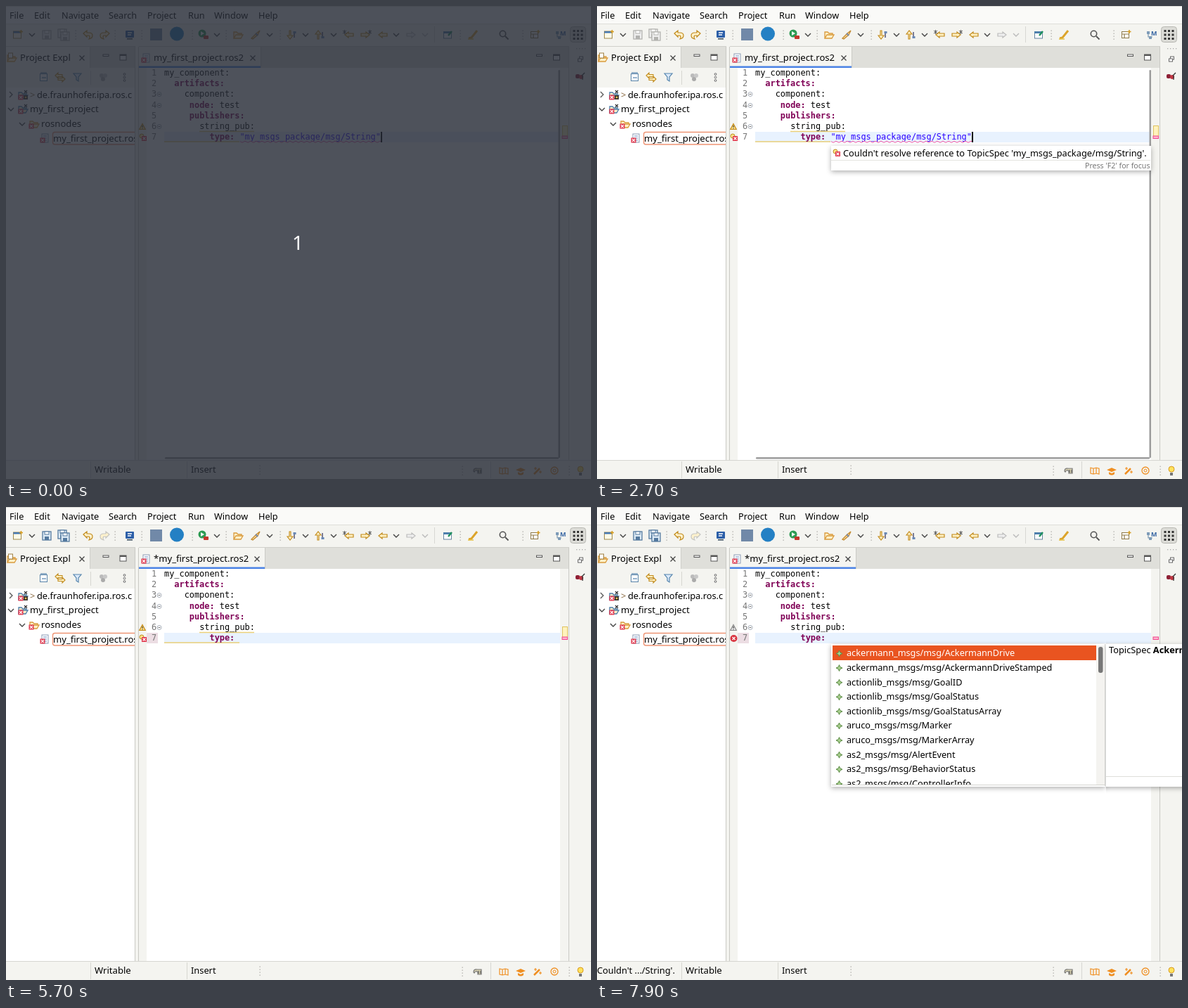
An HTML page that plays this animation: 832x673 px, repeating every 8000 ms.

```html
<!DOCTYPE html>
<html lang="en">
<head>
<meta charset="utf-8">
<title>Editor content assist</title>
<style>
html, body { margin: 0; width: 100%; height: 100%; overflow: hidden; background: #f4f4f0; }
svg { display: block; }
text { font: 12.8px "Noto Sans", "Open Sans", sans-serif; fill: #000; white-space: pre; }
.title { font-size: 13.1px; }
.item { font-size: 12.7px; }
.hint { font-size: 10.6px; fill: #777; }
.code { font: 11.9px "DejaVu Sans Mono", monospace; }
.key { font-weight: bold; fill: #7f0055; }
.str { fill: #2a00ff; }
.num { fill: #777; }
.white, .picked text { fill: #fff; }
</style>
</head>
<body>
<svg id="stage" width="832" height="673"></svg>
<script>
const LOOP = 8000, CHAR = 7.164, LEFT = 225, ROW = 15.2;
const col = c => LEFT + c * CHAR;
const baseline = n => Math.round(99 + ROW * n);

// Markup helpers
const rect = (x, y, w, h, fill, more = '') =>
  `<rect x="${x}" y="${y}" width="${w}" height="${h}" fill="${fill}" ${more}/>`;
const line = (d, stroke = '#444', width = 1.2, fill = 'none') =>
  `<path d="${d}" stroke="${stroke}" stroke-width="${width}" fill="${fill}"/>`;
const shape = (d, fill) => `<path d="${d}" fill="${fill}"/>`;
const dot = (x, y, r, fill, more = '') => `<circle cx="${x}" cy="${y}" r="${r}" fill="${fill}" ${more}/>`;
const text = (x, y, s, cls = '', more = '') => `<text x="${x}" y="${y}" class="${cls}" ${more}>${s}</text>`;
const group = (id, body, more = '') => `<g id="${id}" ${more}>${body}</g>`;

// Icons, drawn around their centre
const chevron = (x, y, c = '#444') => line(`M${x - 4} ${y - 2}l4 4 4-4`, c, 1.4);
const close = (x, y) => line(`M${x - 3.5} ${y - 3.5}l7 7m0-7l-7 7`, '#444', 1.3);
const grip = (x, y = 41) => [-6, -2, 2, 6].map(d => rect(x - .5, y + d - .5, 1.3, 1.3, '#aaa9a4')).join('');
const windowButtons = (x, y) =>
  rect(x - 4, y - 4, 8, 2.5, '#fff', 'stroke="#555"') +
  rect(x + 20, y - 4, 9, 8, '#fff', 'stroke="#555"') + rect(x + 20, y - 4, 9, 2, '#555');
const badge = (x, y) => rect(x - 3.5, y - 3.5, 7, 7, '#e0344a') +
  line(`M${x - 2} ${y - 2}l4 4m0-4l-4 4`, '#fff', 1.2);
const page = (x, y) => rect(x - 4, y - 6, 9, 12, '#fff', 'stroke="#8b9bb5"') +
  line(`M${x - 2} ${y - 3}h5m-5 3h5m-5 3h5`, '#6c8fc4', 1) + badge(x - 3, y + 3);
const folder = (x, y, c = '#d99a3d') =>
  line(`M${x - 6} ${y + 5}v-9h4l2 2h5v2m-11 5l3-5h10l-3 5z`, c, 1.3, '#fff1c9');
const project = (x, y) => folder(x, y, '#4b7eaa') +
  line(`M${x + 2} ${y - 7}l4 4m0-4l-4 4`, '#333', 1.2) + badge(x - 3, y + 3);
const floppy = (x, y, c, fill) => rect(x - 6, y - 6, 12, 12, fill, `stroke="${c}" stroke-width="1.3"`) +
  rect(x - 3, y - 6, 6, 4, '#fff', `stroke="${c}"`) + rect(x - 3, y + 1, 6, 5, c);
const saves = (c, fill) => floppy(58, 41, c, fill) + floppy(80, 39, c, fill) + floppy(84, 43, c, fill);
const flipped = (x, sx, sy, body) => `<g transform="translate(${x} 41) scale(${sx} ${sy})">${body}</g>`;
const bend = (x, s, c) => flipped(x, s, 1,
  line('M-7-2l5-4v3h3q5 0 5 4 0 4-5 5 2-3 0-5h-3v2z', c, 1.2, '#fff2cc'));
const arrow = (x, s, c = '#c18a1b', fill = '#fff0c2') => flipped(x, s, 1,
  line('M-6 0l5-4v2h7v4h-7v2z', c, 1.2, fill));
const step = (x, s) => flipped(x, 1, s, line('M-3-6v7h-3l4 5 4-5h-3v-7z', '#c18a1b', 1.1, '#fff0c2') +
  line('M4-5v9', '#557', 1.5) + rect(2.5, -5, 4, 3, '#6a89b5'));
const star = (x, y) => line(`M${x - 6} ${y - 4}l5 4m-5 0l5-4m-2.5-1v6`, '#555', 1);
const triangle = (x, y, c, fill) => line(`M${x} ${y - 4}l4.2 8h-8.4z`, c, 1.2, fill) +
  line(`M${x} ${y - 1.5}v2.5m0 1v1`, '#333', 1.2);
const spark = (x, y) => line(
  `M${x} ${y - 4.5}l1.4 3.1 3.1 1.4-3.1 1.4-1.4 3.1-1.4-3.1-3.1-1.4 3.1-1.4z`, '#5b8a45', 1, '#a8d08d');
const quickFix = (x, y) => dot(x - 2, y - 2, 3, '#ffe58a', 'stroke="#b98b20"') + badge(x + 1.5, y + 1.5);

function toolbar() {
  const menus = [[5, 'File'], [40, 'Edit'], [79, 'Navigate'], [146, 'Search'], [201, 'Project'],
    [259, 'Run'], [296, 'Window'], [359, 'Help']];
  const grid = [0, 1, 2].flatMap(i => [0, 1, 2].map(j => rect(806.5 + i * 5.5, 34 + j * 5.5, 3, 3, '#333')));
  return rect(0, 0, 832, 26, '#fafaf8') + rect(0, 0, 832, 1, '#d8d8d4') +
    menus.map(([x, s]) => text(x, 18, s, 'item')).join('') + rect(0, 25, 832, 1, '#deded9') +
    rect(10.5, 36, 11, 10, '#fffbe8', 'stroke="#a08a4c"') + rect(10.5, 36, 11, 2.5, '#4678b2') +
    line('M21.5 34v5m-2.5-2.5h5', '#d59b1c', 1.5) +
    [37, 300, 375, 426, 466, 555].map(x => chevron(x, 41)).join('') + chevron(596, 41, '#bbb') +
    [99, 155, 193, 265, 313, 390, 646, 735].map(x => grip(x)).join('') + rect(609, 29, 1, 23, '#d8d8d3') +
    group('clean', saves('#b3b3b0', '#eee') + bend(140, -1, '#c18a1b')) +
    group('dirty', saves('#557a9f', '#dceaf5') + bend(140, -1, '#c5c5c1')) + bend(117, 1, '#c18a1b') +
    rect(170, 35, 12, 10, '#2c5fa8', 'rx="1"') + line('M173 38h6m-6 3h5', '#fff', 1.3) + rect(172, 46, 8, 1.5, '#345') +
    rect(205, 32, 17, 17, '#7189a8') + dot(243, 39.5, 10, '#2480c4') +
    dot(279, 39, 5.5, '#2d9b53') + shape('M277 36l5 3-5 3z', '#fff') +
    rect(281, 42, 7, 5, '#c4382d', 'rx="1"') + folder(330, 41) +
    line('M349 46l7-7 5-4-3 6-7 6z', '#c28a31', 1.3, '#ffe1a2') + line('M355 39l3 3', '#78a', 2) +
    step(406, 1) + step(446, -1) + arrow(488, 1) + star(485, 39) + arrow(511, -1) + star(521, 39) +
    arrow(536, 1) + arrow(576, -1, '#bbb', '#eee') +
    rect(622.5, 36.5, 11, 9.5, '#fff', 'stroke="#6684a0"') + rect(622, 36, 12, 3, '#4e80ad') +
    line('M629 42l5-6', '#20905d', 2.5) +
    line('M658 46l4-1 8-10', '#dca42b', 3) + line('M657 47h8', '#e7c347', 1.5) +
    dot(706.5, 39.5, 4.2, 'none', 'stroke="#555" stroke-width="1.6"') + line('M710 43l4.5 4.5', '#555', 1.8) +
    rect(746.5, 36.5, 10, 9, '#fff', 'stroke="#8e7a4a"') + line('M746 40h11m-7 0v6', '#8e7a4a') +
    line('M757 34v5m-2.5-2.5h5', '#d59b1c', 1.5) +
    line('M784 38v6h6', '#7895af') + rect(782, 36, 4, 4, '#7d9bb8') + rect(785, 43, 4, 4, '#7d9bb8') +
    text(788, 42, 'M', '', 'style="font-size:9px;font-weight:bold;fill:#3564a2"') +
    rect(802.5, 29.5, 22, 22, '#dcdcd7', 'rx="4" stroke="#b8b8b3"') + grid.join('');
}

function explorer() {
  return rect(0, 58, 184, 30, '#dfdfda') + rect(0, 58, 119, 30, '#f4f4f0') + rect(119, 58, 1, 30, '#cfcfca') +
    rect(0, 57, 184, 1, '#d0d0cb') + folder(8, 74) + rect(3.5, 67, 6, 7, '#fff', 'stroke="#a08040"') +
    text(20, 78, 'Project Expl', 'title') + close(108, 74) + windowButtons(142, 73) +
    rect(0, 88, 184, 29, '#f4f4f0') +
    rect(48.5, 96.5, 10, 10, '#fff', 'stroke="#5b85aa"') + line('M51 102h6m-8-7h9', '#356d9f') +
    line('M70 99l4-4v2.5h6v3h-6v2.5zM84 104l-4-4v2.5h-6v3h6v2.5z', '#c18a1b', 1.1, '#fff0c2') +
    line('M96 96h11l-4 5v6l-3-2v-4z', '#5484ad', 1.2, '#dceafa') + rect(120, 92, 1, 20, '#d6d6d1') +
    dot(136, 99, 3, '#bbb') + dot(141, 99, 3, '#c8c8c8') + dot(138, 104, 3, '#aaa') +
    [97, 101.5, 106].map(y => dot(168.5, y, 1.4, '#fff', 'stroke="#666"')).join('') +
    rect(0, 116, 184, 530, '#fff') +
    '<svg width="183" height="673">' +
    line('M5 122l4 4-4 4', '#555', 1.3) + chevron(7, 147) + chevron(23, 168) +
    project(24, 127) + rect(25, 127, 6, 6, '#403a32') + dot(28, 130, 1.3, '#f4c64e') + project(24, 147) +
    text(34, 131, '&gt;', '', 'style="fill:#8a6a42"') + text(44, 131, 'de.fraunhofer.ipa.ros.c') +
    text(34, 151, 'my_first_project', 'title') + folder(40, 168) + badge(36, 171) +
    text(50, 172, 'rosnodes', 'title') + page(55, 188) +
    rect(66.5, 179.5, 140, 17.5, '#fff', 'rx="3" stroke="#ee9474" stroke-width="1.4"') +
    text(67, 193, 'my_first_project.ros2', 'title') + '</svg>' +
    rect(183, 58, 1, 588, '#c9c9c4') + rect(188, 58, 1, 588, '#c9c9c4');
}

// Source lines: [column, words, class]
const source = [[0, 'my_component:', ''], [2, 'artifacts:', 'key'], [4, 'component:', ''], [5, 'node:', 'key'],
  [5, 'publishers:', 'key'], [7, 'string_pub:', ''], [9, 'type:', 'key']];
const code = (c, n, s, cls = '') => text(col(c), baseline(n), s, `code ${cls}`);
const message = code(15, 6, '"my_msgs_package/msg/String"', 'str');
const codeLines = source.map(([c, s, cls], n) => code(c, n, s, cls)).join('') + code(11, 3, 'test');
const squiggle = line('M333 192.5' + 'l2 1.5h2l2-1.5h2'.repeat(25), '#f65aa6', 1);

const tab = (id, width, title) => group(id,
  rect(189, 58, width, 30, '#f5f5f1') + rect(189, 85.5, width, 2.5, '#4b83e5') +
  rect(189 + width, 58, 1, 30, '#cacac5') + page(199, 74) +
  text(210, 78, title, 'title') + close(178 + width, 74));

function editor() {
  const numbers = source.map((_, n) => text(207, baseline(n), n + 1, 'code num')).join('');
  const folds = [2, 3, 5].map(n => dot(218, baseline(n) - 3.5, 3, '#fff', 'stroke="#a9b0bb"') +
    line(`M216.5 ${baseline(n) - 3.5}h3`, '#777', 1)).join('');
  return rect(189, 58, 612, 30, '#dfdfda') + rect(189, 57, 612, 1, '#d0d0cb') +
    tab('tabClean', 173, 'my_first_project.ros2') + tab('tabDirty', 179, '*my_first_project.ros2') +
    windowButtons(758.5, 73) +
    rect(189, 88, 612, 558, '#fff') + rect(189, 88, 11, 558, '#f4f4f0') + rect(788, 88, 12, 558, '#f4f4f0') +
    rect(800, 58, 1, 588, '#c9c9c4') + rect(225, 179, 563, 15, '#e8f2fe') +
    group('changed', rect(200, 179, 16, 15, '#ecdde3')) + numbers + folds +
    group('warned', line('M275 178.5h78M225 193h107', '#ecd078', 1.4) +
      triangle(194, 171.5, '#c58b16', '#ffe28a') + quickFix(195, 187) +
      rect(791.5, 170.5, 7, 15, '#fff3bd', 'stroke="#dfc260"')) +
    group('failed', triangle(194, 171.5, '#888', '#eee') + dot(194.5, 187, 5, '#d93440') +
      line('M192.5 185l4 4m0-4l-4 4', '#fff', 1.4)) +
    rect(791, 185, 7.5, 3.5, '#ffb6cf', 'stroke="#f0438c"') +
    codeLines + group('message', message + squiggle) +
    '<clipPath id="pickClip"><path id="pickPath"/></clipPath>' +
    group('picked', rect(225, 164, 575, 31, '#e95420') + codeLines + message,
      'class="picked" clip-path="url(#pickClip)"') +
    group('bars', rect(785.5, 91, 2.5, 552, '#9c9c9c', 'rx="1.2"') + rect(226, 642, 560, 2.5, '#9c9c9c', 'rx="1.2"')) +
    rect(0, 0, 2, 15, '#000', 'id="caret"');
}

function frame() {
  return rect(801, 58, 31, 588, '#f4f4f0') + [811, 815, 819, 823].map(x => rect(x, 60, 1.3, 1.3, '#aaa')).join('') +
    rect(815.5, 72, 5, 4, '#fff', 'stroke="#666"') + rect(813.5, 75, 5, 4, '#fff', 'stroke="#666"') +
    rect(810, 97, 6, 6, '#8e2035', 'rx="2"') + dot(818, 101, 3, '#c23642') + line('M819 99l4-4m-3 10v-6', '#333', 1.3) +
    rect(0, 646, 832, 27, '#f4f4f0') + rect(0, 646, 832, 1, '#d6d6d1') +
    [120, 257, 689].map(x => rect(x, 648, 1, 24, '#d6d6d1')).join('') +
    text(126, 664, 'Writable', 'title') + text(263, 664, 'Insert') +
    group('status', text(0, 664, "Couldn't .../String'.")) +
    grip(361, 660) + grip(649, 661) + grip(801, 661) +
    line('M665 662q0-5 5-4h6v7h-5v-3q-3-3-5 1z', '#777', 1.2, '#d9d2b0') + line('M672 660v4m3-4v4', '#555') +
    line('M702 657l4 1 4-1 4 1v8l-4-1-4 1-4-1zm4 1v8m4-9v8', '#ef8f22') +
    shape('M725 660l7-3 7 3-7 3zM728 663l4 2 4-2v3q-4 3-8 0z', '#ef8f22') +
    line('M751 666l8-8', '#ef8f22', 2.5) + line('M753 656v4m-2-2h4m5 3v4m-2-2h4', '#ef8f22') +
    dot(780, 661, 5, 'none', 'stroke="#ef8f22" stroke-width="1.3"') + dot(780, 661, 2, 'none', 'stroke="#ef8f22"') +
    dot(817, 659, 4, '#ffe25c', 'stroke="#d79a20"') + rect(815, 664, 4, 4, '#777');
}

const shadowed = 'filter="url(#shadow)"';

const tooltip = () => group('tooltip', rect(333, 199, 455, 35, '#fff', shadowed) +
  rect(333, 219, 454, 1, '#e4e4e0') + quickFix(341, 209) +
  text(350, 214, "Couldn't resolve reference to TopicSpec 'my_msgs_package/msg/String'.") +
  text(694, 231, "Press 'F2' for focus", 'hint'));

function proposals() {
  const names = ['ackermann_msgs/msg/AckermannDrive', 'ackermann_msgs/msg/AckermannDriveStamped',
    'actionlib_msgs/msg/GoalID', 'actionlib_msgs/msg/GoalStatus', 'actionlib_msgs/msg/GoalStatusArray',
    'aruco_msgs/msg/Marker', 'aruco_msgs/msg/MarkerArray', 'as2_msgs/msg/AlertEvent',
    'as2_msgs/msg/BehaviorStatus', 'as2_msgs/msg/ControllerInfo'];
  const rows = names.map((s, i) => spark(344.5, 208.5 + 20.6 * i) +
    text(355, Math.round(212.4 + 20.6 * i), s, i ? 'item' : 'item white')).join('');
  return group('list', rect(333, 195, 390, 203, '#fff', shadowed) + rect(335, 197, 386, 21, '#e95420') +
      `<svg width="722" height="395">${rows}</svg>` + rect(334, 395, 388, 1, '#d4d4d0') +
      rect(722, 195, 1, 202, '#d0d0cc') +
      rect(0, 197, 0, 198, '#f4f3f0', 'id="track"') + rect(0, 199, 3, 37, '#777', 'id="thumb"')) +
    group('info', '<svg x="724" width="108" height="673">' + rect(-20, 195, 150, 203, '#fff', shadowed) +
      rect(0, 383, 108, 1, '#dededa') +
      text(4, 208, 'TopicSpec <tspan font-weight="bold">AckermannDrive</tspan>') + '</svg>');
}

document.getElementById('stage').innerHTML =
  `<defs><filter id="shadow" x="-10%" y="-20%" width="120%" height="150%">
  <feDropShadow dx="0" dy="2" stdDeviation="3.5" flood-opacity=".32"/></filter></defs>` +
  rect(0, 0, 832, 673, '#f4f4f0') + toolbar() + explorer() + editor() + frame() + tooltip() + proposals() +
  group('countdown', rect(0, 0, 832, 673, '#282d38', 'opacity=".82"') +
    text(415, 347, '1', 'white', 'text-anchor="middle" style="font-size:28px"'));

const ui = {};
document.querySelectorAll('[id]').forEach(el => ui[el.id] = el);
const show = (id, on) => ui[id].setAttribute('opacity', Number(on));
const place = (id, values) => Object.entries(values).forEach(([k, v]) => ui[id].setAttribute(k, v));
const ramp = (t, from, to) => Math.min(1, Math.max(0, (t - from) / (to - from)));

const caretOn = [[0, 300], [1500, 2100], [2700, 3300], [3600, 5000], [5200, 5700], [6200, 6500]];
// [time, caret column, caret line]
const drag = [[0, 43, 6], [3600, 38, 6], [3700, 32, 6], [3800, 27, 6], [3900, 18, 5],
  [4100, 21, 6], [4300, 18, 6], [4400, 15, 6]];

function render(t) {
  const edited = t >= 5200, checked = t >= 6000;
  show('countdown', t < 100);
  for (const id of ['clean', 'tabClean', 'message']) show(id, !edited);
  for (const id of ['dirty', 'tabDirty', 'changed']) show(id, edited);
  show('warned', !checked);
  show('failed', checked);
  show('status', checked);
  show('tooltip', t < 3500 ? ramp(t, 700, 1000) : 0);
  show('bars', 1 - ramp(t, 5100, 5700));

  const [, column, row] = drag.filter(s => s[0] <= t).pop();
  const x = col(column), end = col(43);
  place('caret', { x: Math.round(x), y: 179 + (row - 6) * 15 });
  show('caret', caretOn.some(([a, b]) => t >= a && t < b));
  show('picked', t >= 3600 && !edited);
  place('pickPath', { d: row === 5
    ? `M${x} 164H788V179H${end}V194H225V179H${x}z`
    : `M${x} 179H${end}V194H${x}z` });

  show('list', t >= 6500 ? ramp(t, 6400, 6600) : 0);
  show('info', t >= 6700);
  const wide = ramp(t, 7500, 7900);
  place('track', { x: 722 - 12 * wide, width: 12 * wide });
  place('thumb', { x: 718 - 5 * wide, width: 3 + 3.5 * wide, rx: 1.5 + 1.5 * wide,
    opacity: t < 7500 ? .55 * (1 - ramp(t, 6800, 7300)) : .3 + .7 * wide });
}

function tick() {
  render(Math.floor(performance.now() % LOOP / 100) * 100);
  requestAnimationFrame(tick);
}
tick();
</script>
</body>
</html>
```
